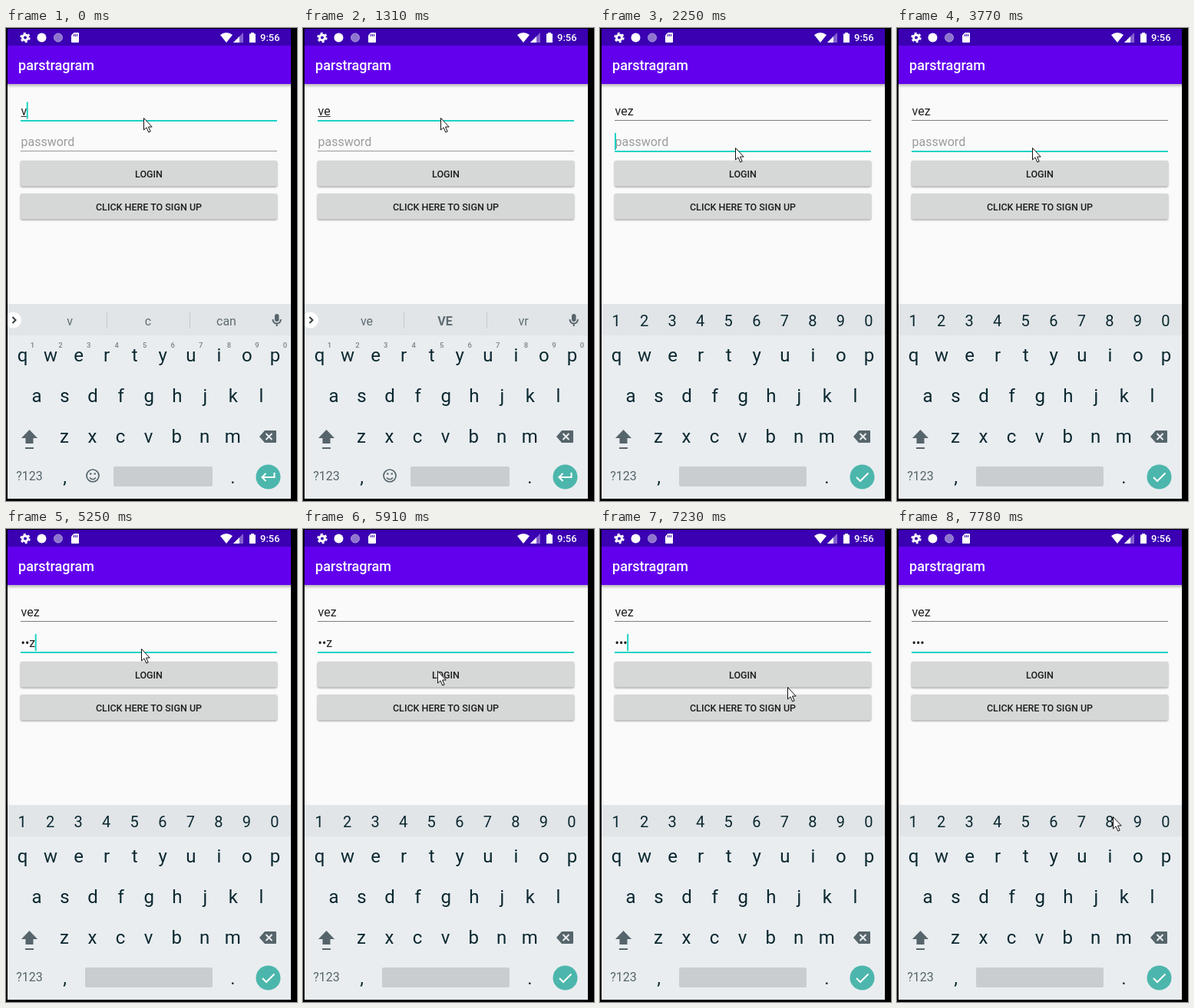
An HTML page that plays this animation: 379 by 617 pixels, repeating every 8 s.

```html
<!DOCTYPE html>
<html lang="en">
<head>
<meta charset="utf-8">
<title>Login screen</title>
<style>
  html, body { margin: 0; width: 100%; height: 100%; overflow: hidden; background: #000; }
  svg { display: block; font-family: Roboto, sans-serif; }
  .mid { text-anchor: middle; }
  .key { font-size: 24px; fill: #0b2830; }
  .num { font-size: 20px; fill: #0b2830; }
  .hint { font-size: 9.5px; font-weight: 500; fill: #788388; }
  .word { font-size: 16px; fill: #5f6c72; }
  .field { font-size: 16px; fill: #222; }
  .button { font-size: 12.5px; font-weight: 500; fill: #1d1d1d; }
  .button rect { fill: #d6d7d7; filter: drop-shadow(0 1px 1px #0006); }
  .button.down rect { filter: drop-shadow(0 2px 2px #0008); }
  .line { fill: none; stroke-width: 2; }
</style>
</head>
<body>
<svg width="379" height="617" viewBox="0 0 379 617">
  <defs>
    <linearGradient id="shade" x2="0" y2="1">
      <stop stop-color="#000" stop-opacity=".28"/>
      <stop offset="1" stop-color="#000" stop-opacity="0"/>
    </linearGradient>
    <clipPath id="screen"><path d="M2 1H371V614H2Z"/></clipPath>
  </defs>
  <g clip-path="url(#screen)">
    <path fill="#fafafa" d="M2 73H371V360H2Z"/>
    <path fill="url(#shade)" d="M2 73H371V78H2Z"/>
    <path fill="#3a00b2" d="M2 1H371V23H2Z"/>
    <path fill="#6200ee" d="M2 23H371V73H2Z"/>

    <!-- Status bar -->
    <g fill="#fff">
      <circle cx="25" cy="12.5" r="3.5" fill="none" stroke="#fff" stroke-width="3"/>
      <circle cx="25" cy="12.5" r="5.7" fill="none" stroke="#fff" stroke-width="2" stroke-dasharray="3 2.97"/>
      <circle cx="46.5" cy="12.5" r="6"/>
      <circle cx="68" cy="12.5" r="5.5" fill="#8f74cf" stroke="#a994dc"/>
      <path d="M88.500 6H94Q95 6 95 7V18Q95 19 94 19H86Q85 19 85 18V9.500Z"/>
      <path stroke="#3a00b2" d="M88.500 8V11M90.500 8V11M92.500 8V11"/>
      <path d="M279 9Q287 3 295 9L287 19Z"/>
      <path fill="#8460d0" d="M309 6V19H296Z"/>
      <path d="M304 11V19H296Z"/>
      <path d="M319 6H323V7.500H325V19H317V7.500H319Z"/>
      <text x="331" y="17" font-size="13" font-weight="500">9:56</text>
      <text x="16" y="55" font-size="18" font-weight="500">parstragram</text>
    </g>

    <!-- Form -->
    <text id="user" class="field" x="19.500" y="114"/>
    <path id="compose" stroke="#333"/>
    <text id="pass" class="field" x="19.500" y="154"/>
    <path id="userLine"/>
    <path id="passLine"/>
    <rect id="caret" width="2" height="22" fill="#1cd3c4"/>
    <g id="login" class="button mid">
      <rect x="19" y="173" width="334" height="33.500" rx="2"/>
      <text x="186" y="195">LOGIN</text>
    </g>
    <g class="button mid">
      <rect x="19" y="216" width="334" height="33.500" rx="2"/>
      <text x="186" y="238">CLICK HERE TO SIGN UP</text>
    </g>

    <!-- Keyboard -->
    <path fill="#e9edf0" d="M2 360H371V614H2Z"/>
    <path fill="#e1e5e8" d="M2 360H371V401H2Z"/>
    <g id="keys" class="mid"></g>
    <g fill="#56656b">
      <path d="M30.500 524L41 535H35.500V542H25.500V535H20ZM25 547H36V549H25Z"/>
      <path d="M337 525H351Q352 525 352 526V540Q352 541 351 541H337L330 533Z"/>
      <path class="line" stroke="#e9edf0" d="M338.500 529L346.500 537M346.500 529L338.500 537"/>
      <text class="mid" x="30.500" y="590" font-size="16">?123</text>
    </g>
    <rect id="space" y="572" height="26" rx="2" fill="#c9cdd0"/>
    <circle cx="341.500" cy="585.500" r="16" fill="#4cb6ac"/>
    <g id="textMode">
      <g id="words" class="word mid">
        <text x="83" y="388"/><text x="185" y="388"/><text x="287" y="388"/>
      </g>
      <path stroke="#c5cacd" d="M131.500 371V392M239.500 371V392"/>
      <circle cx="9.500" cy="381" r="10.500" fill="#fff"/>
      <path class="line" stroke="#333d42" d="M8.500 377L12.500 381L8.500 385"/>
      <rect x="350" y="373" width="5.500" height="10" rx="2.750" fill="#56656b"/>
      <path class="line" stroke="#56656b" stroke-width="1.500" d="M347.500 380Q348 385.500 352.700 385.500T358 380M352.700 385V389"/>
      <g class="line" stroke="#56656b">
        <circle cx="113" cy="584" r="8" stroke-width="1.700"/>
        <path stroke-width="1.500" d="M109 586.500Q113 591 117 586.500"/>
        <path d="M109 581.500H111.500M114.500 581.500H117"/>
      </g>
      <path class="line" stroke="#fff" d="M349.500 580V586H334M338.500 581L333.500 586L338.500 591"/>
    </g>
    <path id="check" class="line" stroke="#fff" d="M334 586L339 591L349.500 580.500"/>
  </g>
  <path id="mouse" fill="#fff" stroke="#111" stroke-linejoin="round" d="M.500 .500V16L4 12.800L6.800 19L9.200 18L6.500 12H11.200Z"/>
</svg>
<script>
const $ = id => document.getElementById(id);
const LOOP = 8000, SWITCH = 2250;

// Each entry: start time, value held until the next entry
const user = [[0, 'v'], [720, 've'], [1450, 'vez']];
const words = [[0, 'v c can'], [720, 've VE vr'], [1570, 'vez VEZ vz']];
const pass = [[0, ''], [4360, 'v'], [4800, '•e'], [5250, '••z'], [6780, '•••']];
const mouse = [
  [0, [179, 117]], [1850, [176, 156]], [5380, [176, 168]], [5500, [176, 182]],
  [5790, [175, 185]], [5920, [174, 189]], [6040, [173, 191]], [7080, [227, 196]],
  [7230, [244, 206]], [7350, [259, 224]], [7500, [277, 305]], [7650, [281, 356]], [7780, [281, 375]]
];
const blinks = [430, 720, 1310, 1450, 1850, 2250, 2720, 3340, 3770, 4210, 5790, 6190, 6780, 7230, 7780];
const at = (steps, t) => steps.findLast(s => s[0] <= t)[1];

const row = (chars, x, y, cls) => [...chars].map((c, i) =>
  `<text class="${cls}" x="${x + i * 36.55}" y="${y}">${c}</text>`).join('');
$('keys').innerHTML =
  row('qwertyuiop', 21.5, 435, 'key') + row('asdfghjkl', 40, 487.5, 'key') +
  row('zxcvbnm', 76, 540.5, 'key') + row(',', 76.5, 594, 'key') + row('.', 295.5, 594, 'key') +
  `<g id="hints">${row('1234567890', 34.5, 417, 'hint')}</g>` +
  `<g id="digits">${row('1234567890', 21, 389, 'num')}</g>`;

const show = (id, on) => $(id).setAttribute('visibility', on ? 'visible' : 'hidden');

function set(id, attrs) {
  for (const name in attrs) $(id).setAttribute(name, attrs[name]);
}

function underline(id, y, focused, idle) {
  set(id, {
    d: `M19 ${y + (focused ? 1 : .5)}H353`,
    stroke: focused ? '#1cd3c4' : idle,
    'stroke-width': focused ? 2 : 1
  });
}

function draw(t) {
  const onPass = t >= SWITCH, secret = at(pass, t);
  $('user').textContent = at(user, t);
  $('pass').textContent = secret || 'password';
  set('pass', { style: secret ? '' : 'fill:#9b9b9b' });

  const userEnd = 19.5 + $('user').getComputedTextLength();
  const passEnd = 19.5 + (secret ? $('pass').getComputedTextLength() : 0);
  set('compose', { d: `M19.500 115.500H${userEnd}` });
  set('caret', { x: (onPass ? passEnd : userEnd) - .5, y: onPass ? 137 : 96.5 });
  show('caret', blinks.filter(b => b <= t).length % 2 === 0);
  underline('userLine', 120, !onPass, '#7d7d7d');
  underline('passLine', 160, onPass, '#9a9a9a');

  at(words, t).split(' ').forEach((word, i) => {
    const el = $('words').children[i];
    el.textContent = word;
    el.setAttribute('font-weight', /[A-Z]/.test(word) ? 700 : 400);
  });
  for (const id of ['compose', 'textMode', 'hints']) show(id, !onPass);
  for (const id of ['digits', 'check']) show(id, onPass);
  set('space', onPass ? { x: 103, width: 166 } : { x: 140, width: 129 });

  $('login').classList.toggle('down', t >= 6650 && t < 6780);
  set('mouse', { transform: `translate(${at(mouse, t)})` });
}

function tick() {
  draw(performance.now() % LOOP);
  requestAnimationFrame(tick);
}
tick();
</script>
</body>
</html>
```
